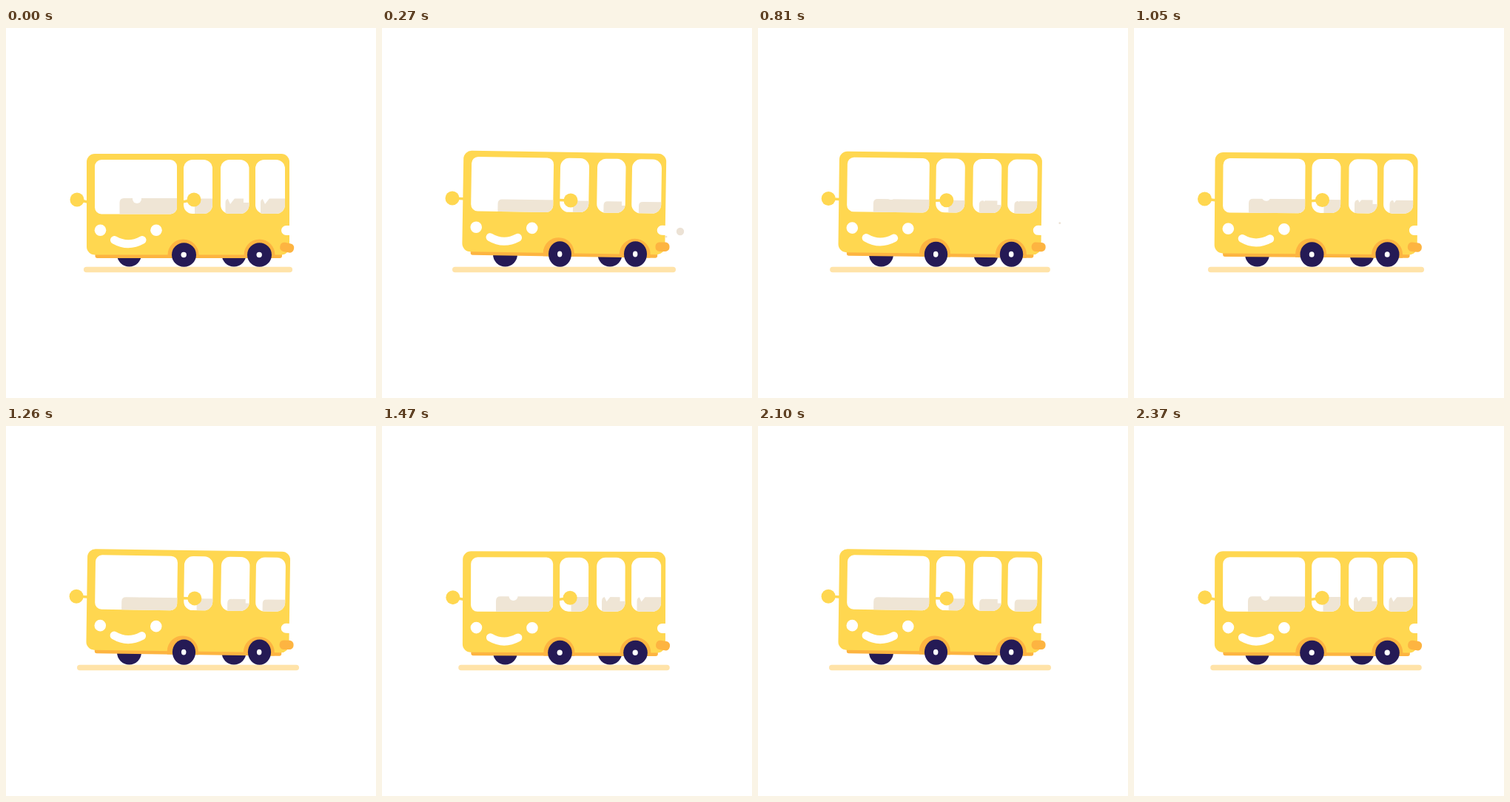
Recreate the animation shown at these times as an HTML page. Size 500 by 500 pixels, loop 2400 ms.

```html
<!DOCTYPE html>
<html lang="en">
<head>
<meta charset="utf-8">
<title>Bus</title>
<style>
  html, body { margin: 0; width: 100%; height: 100%; overflow: hidden; background: #fff; }
  svg { display: block; width: 100vw; height: 100vh; }
</style>
</head>
<body>
<svg viewBox="0 0 500 500">
  <defs>
    <g id="panes">
      <rect x="120" y="178" width="111" height="73.5" rx="9"/>
      <rect x="240" y="178" width="39" height="73" rx="12"/>
      <rect x="290" y="178" width="38.5" height="73" rx="12"/>
      <rect x="337" y="178" width="40" height="73" rx="12"/>
    </g>
    <clipPath id="glass">
      <rect x="120" y="178" width="111" height="73.5" rx="9"/>
      <rect x="240" y="178" width="39" height="73" rx="12"/>
      <rect x="290" y="178" width="38.5" height="73" rx="12"/>
      <rect x="337" y="178" width="40" height="73" rx="12"/>
    </clipPath>
  </defs>

  <line id="ground" y1="326.5" y2="326.5" stroke="#ffe3a9" stroke-width="7.5" stroke-linecap="round"/>
  <g id="smoke" fill="#ece2d5"></g>
  <g fill="#251a55">
    <circle cx="166.5" cy="306" r="16.5"/>
    <circle cx="308" cy="306" r="16.5"/>
  </g>

  <g id="bus">
    <rect x="120.500" y="298" width="252.500" height="13" rx="3" fill="#fdb441"/>
    <rect x="109" y="170" width="274" height="136.500" rx="11" fill="#ffd750"/>
    <use href="#panes" fill="#fff"/>
    <g clip-path="url(#glass)">
      <g id="seats" fill="#efe5d5">
        <path d="M153.500 260V236q0-6 6-6H235V260z"/>
        <path d="M255 260V236q0-5.500 5.500-5.500H285V260z"/>
        <path d="M296.500 260V236q0-5.500 5.500-5.500H321V236H329V260z"/>
        <path d="M344 260V236q0-5.500 5.500-5.500H380V260z"/>
        <g id="dents" fill="#fff">
          <circle cx="177" cy="231" r="6"/>
          <path d="M299 229L303 238L310 229z"/>
          <path d="M346 229L350 238L357 229z"/>
        </g>
      </g>
    </g>
    <g fill="#fff">
      <circle cx="127.500" cy="273.300" r="7.800"/>
      <circle cx="203" cy="273.300" r="7.800"/>
      <path d="M384 267H378.500a6.500 6.500 0 0 0 0 13H384z"/>
    </g>
    <path d="M146.500 286.500Q165 297 184 286.500" fill="none" stroke="#fff" stroke-width="11" stroke-linecap="round"/>
    <g fill="#fdb441">
      <path d="M218.500 311V306.500a21 21 0 0 1 42 0V311z"/>
      <path d="M321.500 311V306.500a21 21 0 0 1 42 0V311z"/>
    </g>
  </g>

  <rect id="pipe" x="-9.500" y="-6.200" width="19" height="12.400" rx="5.500" fill="#fdb441"/>
  <g id="wheels"></g>
  <g id="mirrors" fill="#ffd750" stroke="#ffd750" stroke-width="3.500"></g>
</svg>

<script>
const LOOP = 2400, STEP = 30, BOUNCE = 480;
const $ = id => document.getElementById(id);

function add(parent, tag) {
  return $(parent).appendChild(document.createElementNS("http://www.w3.org/2000/svg", tag));
}
function set(el, attrs) {
  for (const name in attrs) el.setAttribute(name, attrs[name]);
}

const puffs = [
  { start: 90, life: 600, x: 378, y: 276, dx: 49, dy: -2, r: 6.4 },
  { start: 210, life: 660, x: 379, y: 286, dx: 29, dy: -22.5, r: 5 },
  { start: 300, life: 360, x: 378, y: 283, dx: 50, dy: -20, r: 2.8 }
].map(p => ({ ...p, el: add("smoke", "circle") }));

const wheels = [240.5, 342.5].map(x => ({
  x, tyre: add("wheels", "ellipse"), hub: add("wheels", "ellipse")
}));

// Each mirror follows its own drift; its arm stays attached to the tilting body.
const mirrors = [
  { x: 96, dx: -1, dy: -2, armX: 110, armDy: -4.4 },
  { x: 254, dx: 1, dy: 1, armX: 238.5, armDy: -2.4 }
].map(m => ({ ...m, arm: add("mirrors", "line"), disc: add("mirrors", "circle") }));

function lift(t) {
  const phase = t % BOUNCE / BOUNCE;
  const linear = 1 - Math.abs(1 - 2 * phase);
  return 1.07 * (linear + Math.sin(Math.PI * phase)) / 2;
}

function draw(t) {
  const p = lift(t);
  set($("ground"), { x1: 108.7 - 10 * p, x2: 383.3 + 10 * p });
  set($("bus"), { transform: `rotate(${0.9 * p} 390 255)` });
  set($("seats"), { transform: `translate(${2.8 * p} ${5 * p})` });
  set($("dents"), { transform: `translate(0 ${-8 * p})` });
  set($("pipe"), { transform: `translate(${379.7 - 0.7 * p} ${296.7 - p}) rotate(${12 * (1 - p)})` });

  for (const w of wheels) {
    const cy = 306.5 - p;
    set(w.tyre, { cx: w.x, cy, rx: 16.5 - p, ry: 16.3 + p, fill: "#251a55" });
    set(w.hub, { cx: w.x - 0.3, cy, rx: 3.7 - 0.5 * p, ry: 3.7 + 0.3 * p, fill: "#fff" });
  }
  for (const m of mirrors) {
    const x = m.x + m.dx * p, y = 232 + m.dy * p;
    set(m.disc, { cx: x, cy: y, r: 9.5, stroke: "none" });
    set(m.arm, { x1: x, y1: y, x2: m.armX, y2: 235 + m.armDy * p });
  }
  for (const s of puffs) {
    const u = Math.min(1, Math.max(0, (t - s.start) / s.life));
    const out = 1 - (1 - u) ** 2;
    set(s.el, { cx: s.x + s.dx * out, cy: s.y + s.dy * out, r: Math.max(0, s.r * Math.sin(Math.PI * u)) });
  }
}

const begin = performance.now();
function tick() {
  const t = (performance.now() - begin) % LOOP;
  draw(Math.floor(t / STEP) * STEP);
  requestAnimationFrame(tick);
}
tick();
</script>
</body>
</html>
```
